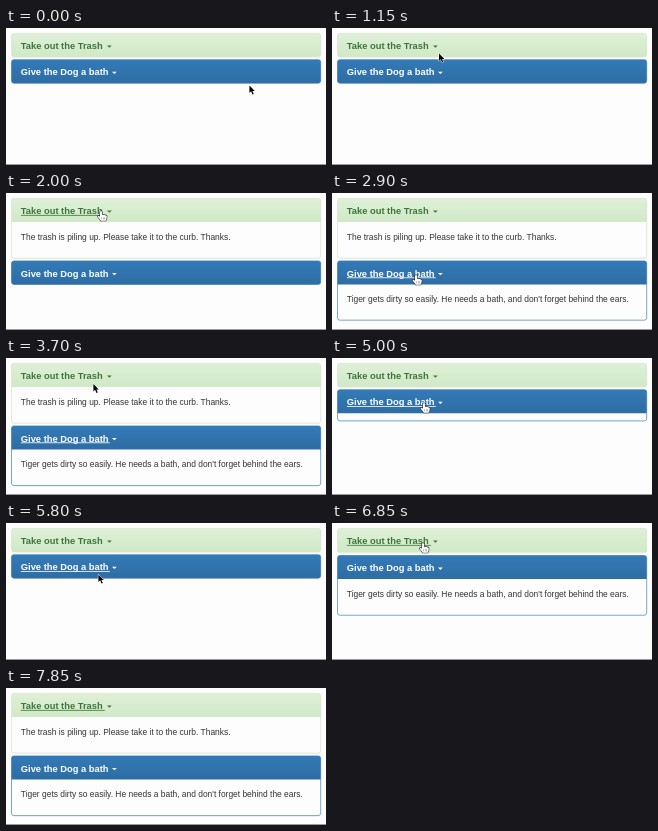
These frames come from a looping animation (320 by 137 pixels, 8 s). An HTML page with a canvas:

```html
<!DOCTYPE html>
<html lang="en">
<head>
<meta charset="utf-8">
<title>Collapsible panels</title>
<style>
html, body { margin: 0; width: 100%; height: 100%; overflow: hidden; background: #fdfdfd; }
canvas { display: block; width: 100vw; height: 100vh; }
</style>
</head>
<body>
<canvas></canvas>
<script>
const W = 320, H = 137, LOOP = 8000, STEP = 50;
const LEFT = 5.5, WIDTH = 309.2, TOP = 5.4, HEAD = 23.5, BODY = 36.2, GAP = 2.8;
const TEXT_LEFT = 14.8, COLLAPSE = 350;
const FONT = '"Liberation Sans", Arial, sans-serif';
const PAGE = '#fdfdfd';

const panels = [
  { title: 'Take out the Trash', textWidth: 82,
    body: 'The trash is piling up. Please take it to the curb. Thanks.',
    colors: ['#dff0d8', '#d0e9c6'], ink: '#3c763d', border: '#d6e2cd' },
  { title: 'Give the Dog a bath', textWidth: 87,
    body: "Tiger gets dirty so easily. He needs a bath, and don't forget behind the ears.",
    colors: ['#337ab7', '#2e6da4'], ink: '#fff', border: '#337ab7' }
];

// [time, panel index]; every click toggles its panel and gives it focus
const clicks = [[1500, 0], [2600, 1], [3850, 0], [4830, 1], [5950, 1], [6837, 0]];

// [time, x, y] of the pointer tip
const path = [
  [0, 243, 57], [400, 190, 61], [850, 128, 38], [1350, 95, 18], [2050, 95, 18],
  [2450, 84, 82], [3000, 84, 82], [3350, 87, 25.5], [3700, 87, 25.5], [3800, 87, 20],
  [4250, 87, 20], [4350, 87, 29], [4400, 87, 29], [4600, 92, 45], [5500, 92, 45],
  [5700, 92, 51], [5800, 92, 51], [5900, 92, 46], [6350, 92, 46], [6700, 91, 20],
  [7500, 91, 20], [7750, 100, -14], [LOOP, 100, -14]
];

const canvas = document.querySelector('canvas');
const ctx = canvas.getContext('2d');

// CSS "ease": cubic-bezier(.25, .1, .25, 1)
function ease(x) {
  if (x <= 0) return 0;
  if (x >= 1) return 1;
  const curve = (u, a, b) => 3 * u * (1 - u) ** 2 * a + 3 * u * u * (1 - u) * b + u ** 3;
  let lo = 0, hi = 1;
  for (let i = 0; i < 20; i++) {
    const mid = (lo + hi) / 2;
    if (curve(mid, .25, .25) < x) lo = mid; else hi = mid;
  }
  return curve(lo, .1, 1);
}

function pointerAt(t) {
  const i = Math.max(1, path.findIndex(p => p[0] > t));
  const [t0, x0, y0] = path[i - 1], [t1, x1, y1] = path[i];
  const u = (t - t0) / (t1 - t0), k = u * u * (3 - 2 * u);
  return { x: x0 + (x1 - x0) * k, y: y0 + (y1 - y0) * k };
}

function openness(index, t) {
  let target = 0, value = 0;
  for (const [start, panel] of clicks) {
    if (panel !== index || start > t) continue;
    target = 1 - target;
    const k = ease((t - start) / COLLAPSE);
    value = target ? k : 1 - k;
  }
  return value;
}

function box(x, y, w, h, radii) {
  ctx.beginPath();
  ctx.roundRect(x, y, w, h, radii);
}

function text(str, x, y, font, color) {
  ctx.font = font + ' ' + FONT;
  ctx.fillStyle = color;
  ctx.fillText(str, x, y);
}

function drawPanel(panel, y, open, underlined) {
  const height = HEAD + BODY * open;
  box(LEFT, y + .6, WIDTH, height, 2.4);
  ctx.fillStyle = 'rgba(0,0,0,.05)';
  ctx.fill();
  box(LEFT, y, WIDTH, height, 2.4);
  ctx.fillStyle = PAGE;
  ctx.fill();

  if (open > 0) {
    ctx.save();
    ctx.beginPath();
    ctx.rect(LEFT, y + HEAD, WIDTH, BODY * open);
    ctx.clip();
    text(panel.body, TEXT_LEFT, y + 41.4, '8.43px', '#333');
    ctx.restore();
  }

  const fill = ctx.createLinearGradient(0, y, 0, y + HEAD);
  panel.colors.forEach((c, i) => fill.addColorStop(i, c));
  const low = open > 0 ? 0 : 2.4;
  box(LEFT, y, WIDTH, HEAD, [2.4, 2.4, low, low]);
  ctx.fillStyle = fill;
  ctx.fill();
  box(LEFT, y, WIDTH, height, 2.4);
  ctx.strokeStyle = panel.border;
  ctx.lineWidth = .65;
  ctx.stroke();

  text(panel.title, TEXT_LEFT, y + 15.6, 'bold 9.35px', panel.ink);
  if (underlined) ctx.fillRect(TEXT_LEFT, y + 16.5, panel.textWidth + 2, .8);
  const caret = TEXT_LEFT + panel.textWidth + 4.2;
  ctx.beginPath();
  ctx.moveTo(caret, y + 12);
  ctx.lineTo(caret + 4.8, y + 12);
  ctx.lineTo(caret + 2.4, y + 14.4);
  ctx.fill();
}

function outline(d, fill, stroke, width) {
  const shape = new Path2D(d);
  ctx.lineWidth = width;
  ctx.lineJoin = 'round';
  ctx.strokeStyle = stroke;
  ctx.stroke(shape);
  ctx.fillStyle = fill;
  ctx.fill(shape);
}

function drawPointer({ x, y }, isHand) {
  ctx.save();
  ctx.translate(x, y);
  if (isHand) {
    outline('M-1 .8Q0-.6 1 .8V4Q2 3 2.8 4.1Q3.8 3.4 4.5 4.5Q5.6 4.1 5.8 5.4' +
      'Q5.8 8 4.6 9.8H-.3Q-1.2 8-3.3 5.7Q-3.6 4.5-2.3 4.7L-1 5.8Z', '#fff', '#222', 1.1);
    ctx.fillStyle = '#555';
    for (const dx of [.6, 2, 3.4]) ctx.fillRect(dx, 6.2, .4, 2.2);
  } else {
    outline('M.4.4V7.9L2.1 6.3L3.5 9.5L4.8 8.9L3.4 5.9H5.8Z', '#000', '#fff', 1);
  }
  ctx.restore();
}

function draw(t) {
  const pointer = pointerAt(t);
  const last = clicks.filter(c => c[0] <= t).pop();
  const focus = last ? last[1] : -1;
  let y = TOP, isHand = false;

  ctx.fillStyle = PAGE;
  ctx.fillRect(0, 0, W, H);
  panels.forEach((panel, i) => {
    const open = openness(i, t);
    const hover = pointer.x > 14 && pointer.x < 24 + panel.textWidth &&
      pointer.y > y + 7.3 && pointer.y < y + 18.5;
    isHand = isHand || hover;
    drawPanel(panel, y, open, hover || focus === i);
    y += HEAD + BODY * open + GAP;
  });
  ctx.fillStyle = '#9b9b9b';
  ctx.fillRect(0, 136, W, 1);
  drawPointer(pointer, isHand);
}

function frame() {
  const ratio = window.devicePixelRatio || 1;
  const w = Math.round(innerWidth * ratio), h = Math.round(innerHeight * ratio);
  if (canvas.width !== w || canvas.height !== h) {
    canvas.width = w;
    canvas.height = h;
  }
  ctx.setTransform(w / W, 0, 0, h / H, 0, 0);
  draw(Math.floor(performance.now() % LOOP / STEP) * STEP);
  requestAnimationFrame(frame);
}
frame();
</script>
</body>
</html>
```
